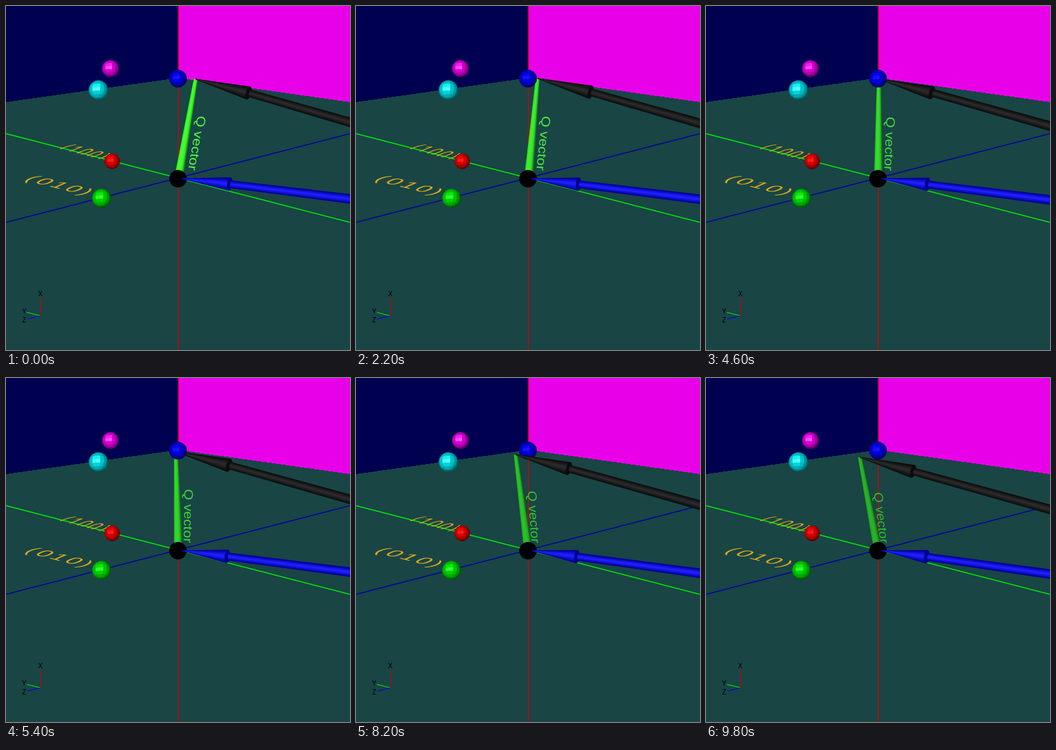
Animation, 512 px wide and 512 px high, one loop 10 s. Source, as an HTML page:

```html
<!DOCTYPE html>
<html lang="en">
<head>
<meta charset="utf-8">
<title>Q vector</title>
<style>
  html, body { margin: 0; width: 100%; height: 100%; overflow: hidden; background: #194545; }
  svg { display: block; width: 100vw; height: 100vh; }
  text { font-family: "Liberation Sans", Arial, sans-serif; }
  .gold { font-size: 20px; letter-spacing: 2.5px; fill: #e0ac18; }
  .axis { font-size: 10px; text-anchor: middle; fill: #000; }
</style>
</head>
<body>
<svg viewBox="0 0 512 512">
  <defs>
    <clipPath id="above"><path d="M0 0H512V324L0 192Z"/></clipPath>
  </defs>
  <g shape-rendering="crispEdges">
    <rect width="512" height="512" fill="#194545"/>
    <path d="M0 0H256V107L0 143Z" fill="#000050"/>
    <path d="M256 0H512V143L256 107Z" fill="#e800e8"/>
  </g>
  <path d="M0 322L512 190" stroke="#0000a0" stroke-width="1.5"/>
  <path d="M0 190L512 322" stroke="#00f000" stroke-width="1.5"/>
  <path d="M256.5 0V512" stroke="#d80000" stroke-width="1.4"/>
  <g clip-path="url(#above)">
    <text class="gold" transform="matrix(1.1 .28 -1.6 .6 75 213.4)">(100)</text>
  </g>
  <text class="gold" transform="matrix(1.6 .4 -1.24 .54 26 259)">(010)</text>
  <g id="balls"></g>
  <text id="label" font-size="21">Q vector</text>
  <g id="behind"></g>
  <g id="rod"></g>
  <g id="front"></g>
  <g id="hub"></g>
  <g id="beam"></g>
  <g fill="none" stroke-width="1.2">
    <path d="M51.5 461V434" stroke="#c80000"/>
    <path d="M51 461L31 456" stroke="#00f000"/>
    <path d="M51 461L32 466" stroke="#0000f0"/>
  </g>
  <text class="axis" x="51" y="431.500">X</text>
  <text class="axis" x="27" y="458">Y</text>
  <text class="axis" x="27" y="471">Z</text>
</svg>
<script>
(() => {
  const STEP = 200, STEPS = 50;
  const $ = id => document.getElementById(id);
  const rgb = c => `rgb(${c.map(v => Math.round(Math.min(255, v)))})`;
  const mix = (a, b, k) => a.map((v, n) => v + (b[n] - v) * k);
  const poly = (pts, fill, extra = "") =>
    `<polygon points="${pts.map(p => p.map(v => v.toFixed(2))).join(" ")}" fill="${fill}" ${extra}/>`;

  // Flat-shaded sphere built from latitude and longitude facets.
  function ball(x, y, r, color, shine = 150) {
    const rows = 8, cols = 14;
    const at = (u, v) => {
      const lat = Math.PI * (v / rows - .5), lon = Math.PI * (2 * u / cols - .5);
      const sy = Math.sin(lat), z = Math.cos(lat) * Math.cos(lon);
      return [Math.cos(lat) * Math.sin(lon), sy * .95 - z * .31, z * .95 + sy * .31];
    };
    let out = `<circle cx="${x}" cy="${y}" r="${r}" fill="${rgb(color.map(c => c * .5))}"/>`;
    for (let v = 0; v < rows; v++) for (let u = 0; u < cols; u++) {
      const n = at(u + .5, v + .5);
      if (n[2] < .08) continue;
      const lit = Math.max(0, -.2 * n[0] - .2 * n[1] + .96 * n[2]);
      const fill = rgb(color.map(c => c * (.4 + .6 * lit) + shine * lit ** 24));
      const pts = [[u, v], [u + 1, v], [u + 1, v + 1], [u, v + 1]].map(([a, b]) => {
        const p = at(a, b);
        return [x + r * p[0], y + r * p[1]];
      });
      out += poly(pts, fill, `stroke="${fill}" stroke-width=".4"`);
    }
    return out;
  }

  // Tapered strip; lo and hi pick a band across its width, from -1 to 1.
  function strip([x1, y1], r1, [x2, y2], r2, fill, lo = -1, hi = 1) {
    const len = Math.hypot(x2 - x1, y2 - y1);
    const nx = (y1 - y2) / len, ny = (x2 - x1) / len;
    const p = (x, y, r) => [x + nx * r, y + ny * r];
    return poly([p(x1, y1, r1 * lo), p(x2, y2, r2 * lo), p(x2, y2, r2 * hi), p(x1, y1, r1 * hi)], fill);
  }

  function round(a, ra, b, rb, dark, light) {
    let out = strip(a, ra, b, rb, rgb(dark));
    for (let n = 1; n < 5; n++) {
      const w = 1 - n / 5;
      out += strip(a, ra, b, rb, rgb(mix(dark, light, n / 4)), -w, w);
    }
    return out;
  }

  function arrow(tip, base, end, dark, light, rim) {
    const tilt = Math.atan2(end[1] - base[1], end[0] - base[0]) * 180 / Math.PI;
    const [x, y] = base;
    return round(tip, .6, base, 10, dark, light) +
      `<ellipse cx="${x}" cy="${y}" rx="4" ry="10" fill="${rim}" transform="rotate(${tilt} ${x} ${y})"/>` +
      round([x + 1, y + .2], 5.8, end, 7.1, dark, light);
  }

  const blueBall = ball(256, 108, 13, [0, 0, 235], 40);
  $("balls").innerHTML =
    ball(155.5, 93, 12.3, [235, 0, 235]) +
    ball(137.5, 125, 14.3, [0, 225, 235]) +
    ball(158, 231, 11.3, [235, 0, 0], 60) +
    ball(142, 286, 13.8, [0, 225, 0], 80);
  $("hub").innerHTML = `<circle cx="256" cy="257" r="13" fill="#000"/>`;

  function draw(ms) {
    const i = Math.floor(ms / STEP) % STEPS, k = i / (STEPS - 1), q = i * i;
    const tip = [282.5 - 1.09 * i, 109 - .184 * i + .0075 * q];
    const foot = [258 - .06 * i, 250];

    // Reading direction and glyph height of the label.
    const sx = 285 - .72 * i, sy = 163 + .0029 * q;
    const ex = 271 - .24 * i, ey = 244 + .04 * i;
    $("label").setAttribute("transform",
      `matrix(${(ex - sx) / 79.4} ${(ey - sy) / 79.4} -.88 ${-.1 + .002 * i} ${sx} ${sy})`);
    $("label").setAttribute("fill", rgb(mix([80, 255, 65], [50, 185, 50], k)));

    const dark = mix([28, 150, 24], [18, 98, 24], k);
    const lit = mix([65, 255, 45], [40, 178, 42], k);
    const rod = strip(tip, 3, foot, 6.2, rgb(dark)) +
      strip(tip, 3, foot, 6.2, rgb(mix(dark, lit, .75)), -.65, 1) +
      strip(tip, 3, foot, 6.2, rgb(lit), -.2, .75);
    const spear = arrow(tip, [361 - 1.08 * i, 129.5 - .197 * i + .008 * q],
      [516, 174.2 + .055 * i + .00824 * q], [12, 12, 12], [42, 42, 42], "#0c0c0c");

    // The rod swings from behind the blue ball to in front of it.
    const passed = i >= 30;
    $("behind").innerHTML = passed ? blueBall : "";
    $("rod").innerHTML = rod + spear;
    $("front").innerHTML = passed ? "" : blueBall;

    $("beam").innerHTML = arrow([262, 257],
      [333 - .18 * i + .0018 * q, 265 + .02 * i],
      [516, 287.6 + .03 * i + .0014 * q], [0, 0, 150], [30, 30, 255], "#000088");
  }

  let last = -1;
  function tick() {
    const now = performance.now(), n = Math.floor(now / STEP);
    if (n !== last) draw(now);
    last = n;
    requestAnimationFrame(tick);
  }
  tick();
})();
</script>
</body>
</html>
```
